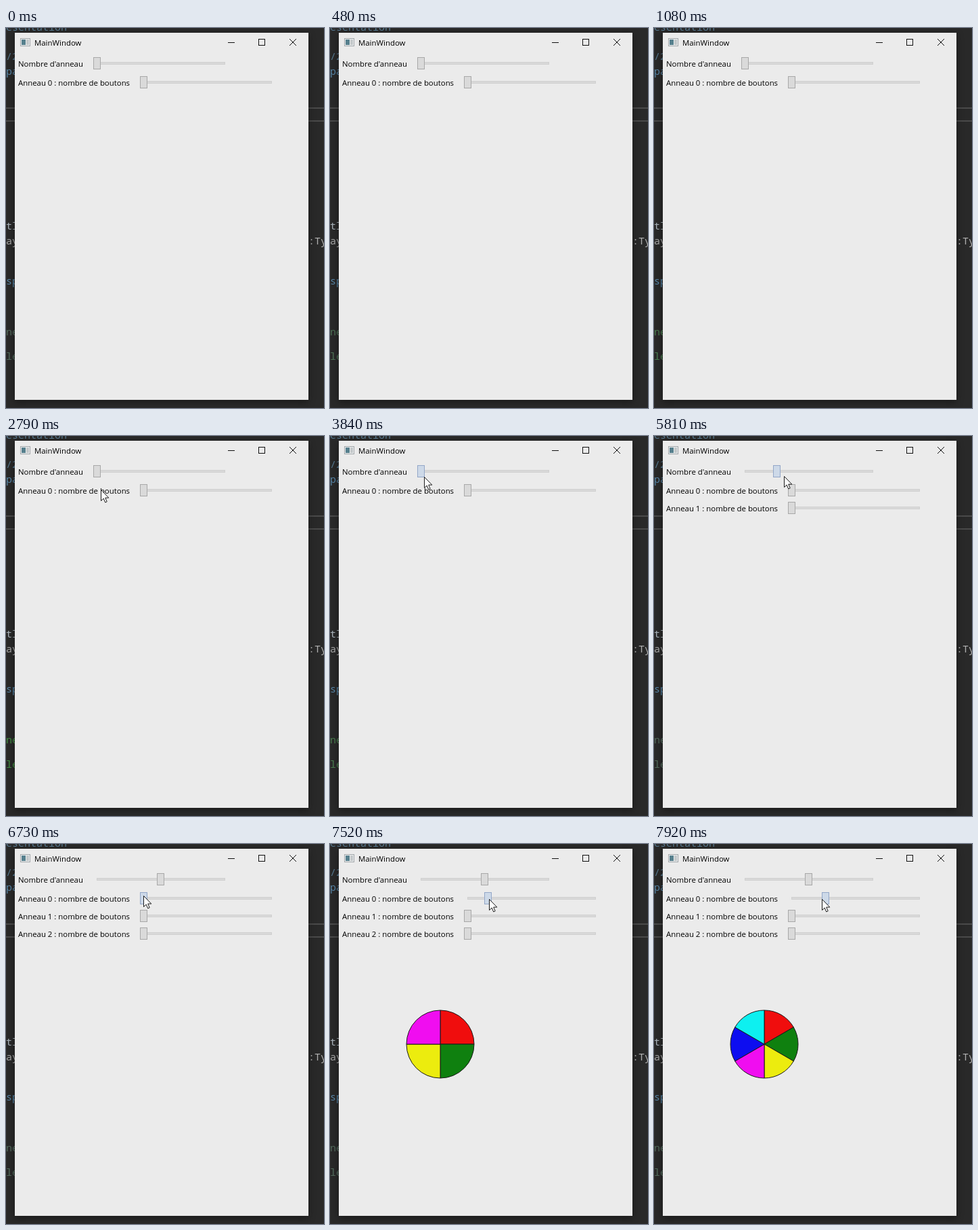
An HTML page with a canvas for the animation above (8 s loop, 470 by 560 pixels).

```html
<!DOCTYPE html>
<html lang="fr">
<head>
<meta charset="utf-8">
<title>MainWindow</title>
<style>
html, body { margin: 0; width: 470px; height: 560px; overflow: hidden; background: #292929; }
canvas { display: block; }
</style>
</head>
<body>
<canvas id="stage" width="470" height="560"></canvas>
<script>
const ctx = document.getElementById('stage').getContext('2d');
const LOOP = 8000;
const UI = '11.4px "Open Sans", "Noto Sans", sans-serif';
const MONO = '15px "Noto Sans Mono", "DejaVu Sans Mono", monospace';
const SLICES = ['#f00d0d', '#0f800f', '#ecec0e', '#f00df0', '#0d0df0', '#0df0f0'];

// Main slider is held from GRAB to DROP; the first ring's slider from HOVER on.
const GRAB = 3380, DROP = 6400, HOVER = 6730;
const MAIN = { x: 134, step: 47.25 };
const RING = { x: 203, step: 10 };

// pointer: time, x, y
const POINTER = [
  [2260, 102, 275], [2790, 140, 79], [3120, 141, 58], [3840, 139, 60],
  [4300, 148, 61], [4560, 160, 57], [4820, 163, 57], [5410, 179, 57],
  [DROP, 210, 61], [HOVER, 203, 76], [7190, 213, 77], [7520, 235, 81], [7920, 248, 81]
];

// Glides between points up to DROP; later the app is busy and the pointer jumps.
function pointer(t) {
  const i = POINTER.findLastIndex(p => p[0] <= t);
  if (i < 0) return null;
  const [t0, x0, y0] = POINTER[i];
  if (t >= DROP) return { x: x0, y: y0 };
  const [t1, x1, y1] = POINTER[i + 1];
  const k = (t - t0) / (t1 - t0);
  return { x: x0 + (x1 - x0) * k, y: y0 + (y1 - y0) * k };
}

const snap = (slider, x) => Math.max(0, Math.round((x - slider.x) / slider.step));

function box(x, y, w, h, fill) {
  ctx.fillStyle = fill;
  ctx.fillRect(x, y, w, h);
}

function frame(x, y, w, h, fill, line) {
  box(x, y, w, h, line);
  box(x + 1, y + 1, w - 2, h - 2, fill);
}

function text(str, x, y, color, font) {
  ctx.font = font;
  ctx.fillStyle = color;
  ctx.fillText(str, x, y);
}

function line(x0, y0, x1, y1) {
  ctx.beginPath();
  ctx.moveTo(x0, y0);
  ctx.lineTo(x1, y1);
  ctx.stroke();
}

function editor(t) {
  box(0, 0, 470, 560, '#292929');
  box(0, 117, 470, 2, '#4a4a4a');
  box(0, 136, 470, 2, '#4a4a4a');
  const glow = Math.max(0, 1 - Math.abs(t - 2500) / 2500);
  const green = `rgb(${83 - 20 * glow}, ${107 + 40 * glow}, ${93 - 30 * glow})`;
  [
    ['esentation', 4, '#56788f'], ['/2', 47, '#56788f'], ['pa', 69, '#5886a8'],
    ['tl', 297, '#a9b3ba'], ['ay', 319, '#a8a8a8'], ['sp', 378, '#5886a8'],
    ['ne', 453, green], ['le', 489, green]
  ].forEach(([s, y, c]) => text(s, 0, y, c, MONO));
  text(':Ty', 447, 319, '#b0b0b0', MONO);
}

function chrome() {
  ctx.save();
  ctx.shadowColor = 'rgba(0,0,0,.4)';
  ctx.shadowBlur = 10;
  ctx.shadowOffsetY = 3;
  box(13, 7, 434, 541, '#ebebeb');
  ctx.restore();

  frame(21, 15, 15, 12, '#eceeef', '#a3a8ab');
  box(23, 17, 6, 8, '#56808d');
  box(30, 17, 4, 8, '#c3c8ca');
  text('MainWindow', 42, 26, '#000', UI);

  ctx.strokeStyle = '#111';
  ctx.lineWidth = 1;
  line(328, 21.5, 338, 21.5);
  ctx.strokeRect(373.5, 16.5, 9, 9);
  line(419, 16, 429, 26);
  line(429, 16, 419, 26);
}

function slider(label, x, y, pos, hot) {
  text(label, 18, y + 5, '#000', UI);
  frame(x, y - 2, 190, 4, '#d9d9d9', '#d0d0d0');
  frame(Math.floor(x + pos - 5), y - 9, 11, 18,
    hot ? '#cdd9e8' : '#dadada', hot ? '#93a7c8' : '#a8a8a8');
}

function wheel(count) {
  ctx.strokeStyle = '#1a1a1a';
  ctx.lineWidth = 1;
  const step = 2 * Math.PI / count;
  for (let i = 0; i < count; i++) {
    const a = i * step - Math.PI / 2;
    ctx.beginPath();
    ctx.moveTo(163, 295);
    ctx.arc(163, 295, 50, a, a + step);
    ctx.closePath();
    ctx.fillStyle = SLICES[i];
    ctx.fill();
    ctx.stroke();
  }
}

const ARROW = new Path2D('M0 0V16L3.7 12.6L6.2 18.4L8.7 17.3L6.2 11.6H11.3Z');

function arrow({ x, y }) {
  ctx.save();
  ctx.translate(Math.round(x) + .5, Math.round(y) + .5);
  ctx.fillStyle = '#fff';
  ctx.fill(ARROW);
  ctx.strokeStyle = '#1c1c1c';
  ctx.lineWidth = 1;
  ctx.stroke(ARROW);
  ctx.restore();
}

function draw(t) {
  const hand = pointer(t);
  const main = t < GRAB ? 0 : snap(MAIN, pointer(Math.min(t, DROP)).x);
  const ring = t < HOVER ? 0 : snap(RING, hand.x);

  editor(t);
  chrome();
  slider("Nombre d'anneau", MAIN.x, 52, main * MAIN.step, t >= GRAB && t < DROP);
  for (let i = 0; i <= main; i++) {
    const pos = i ? 0 : ring * RING.step;
    slider(`Anneau ${i} : nombre de boutons`, RING.x, 80 + i * 26, pos, !i && t >= HOVER);
  }
  if (ring > 1) wheel(ring + 1);
  if (hand) arrow(hand);
}

const start = performance.now();
function tick() {
  draw((performance.now() - start) % LOOP);
  requestAnimationFrame(tick);
}
tick();
</script>
</body>
</html>
```
